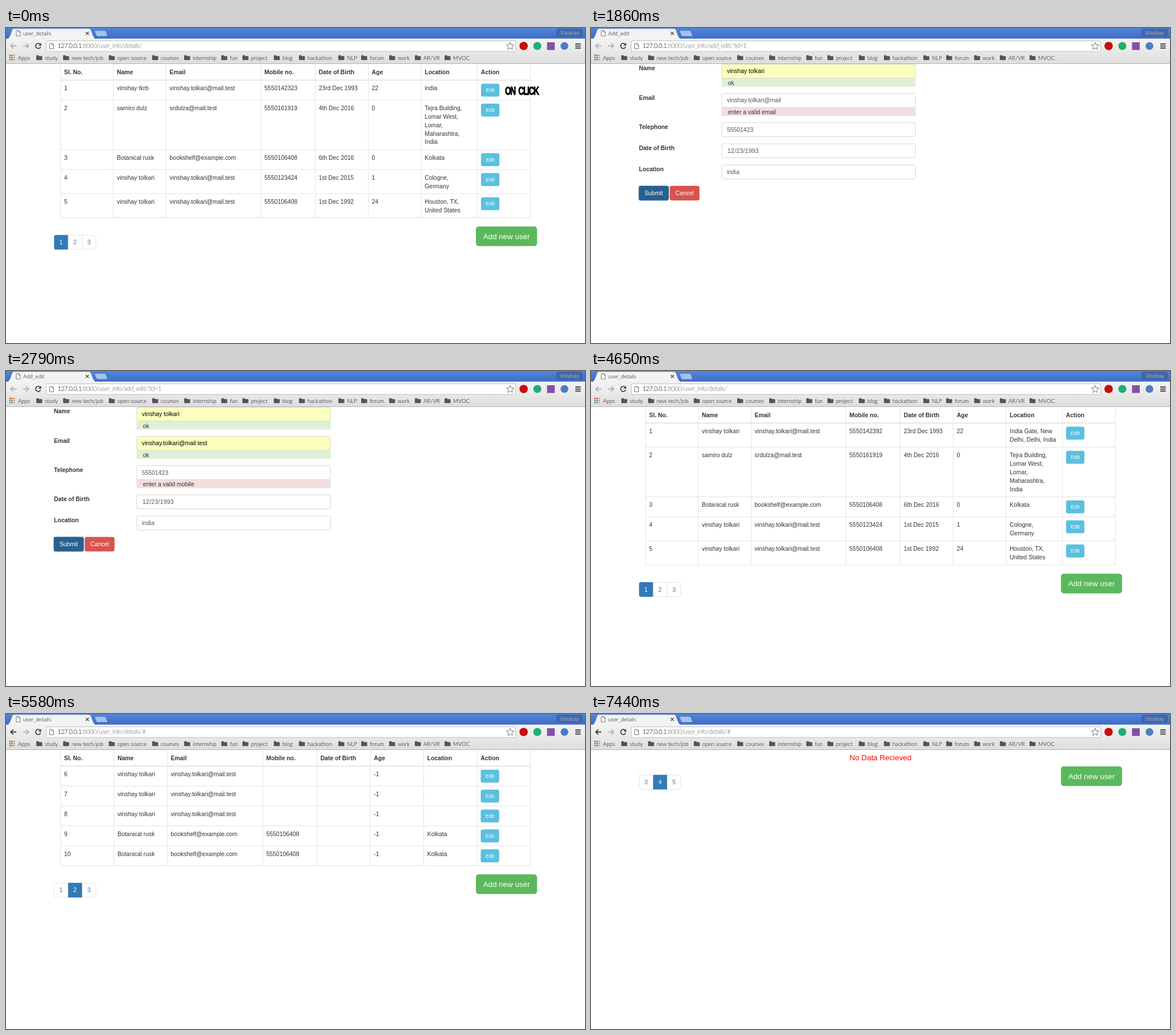
These frames come from a looping animation (1014x552 px, 8 s). An HTML page:

```html
<!DOCTYPE html>
<html lang="en">
<head>
<meta charset="utf-8">
<title>User details</title>
<style>
  html, body { margin: 0; width: 100%; height: 100%; overflow: hidden; background: #fff; }
  #stage { position: relative; width: 1014px; height: 552px; overflow: hidden; }
  #reel { position: absolute; left: 0; top: 0; animation: reel 8s step-end infinite; }
  #reel svg { display: block; width: 1014px; height: 552px; overflow: hidden; }
  @keyframes reel {
    0% { transform: translateY(0); }
    11.625% { transform: translateY(-552px); }
    23.25% { transform: translateY(-1104px); }
    34.875% { transform: translateY(-1656px); }
    46.5% { transform: translateY(-2208px); }
    58.125% { transform: translateY(-2760px); }
    69.75% { transform: translateY(-3312px); }
    81.375% { transform: translateY(-3864px); }
    93%, 100% { transform: translateY(-4416px); }
  }
  text { font: 10.39px "Liberation Sans", Arial, sans-serif; fill: #333; }
  .b { font-weight: bold; }
  .mid { text-anchor: middle; }
  .w { fill: #fff; }
  .ui { font: 300 9.7px Lato, sans-serif; fill: #000; }
  .badge { fill: #e4dccb; }
  .url { font: 300 11.2px Lato, sans-serif; letter-spacing: -.48px; fill: #666; }
  .url tspan { fill: #000; }
  .small { font-size: 8.9px; }
  .big { font-size: 13.36px; }
  .link { fill: #337ab7; }
  .red { fill: #f00; }
  .val { fill: #555; }
  .auto { fill: #000; }
  .date { letter-spacing: .3px; fill: #555; }
  .hit { font-size: 9.65px; fill: #000; }
  .hit .sub { font-size: 8.2px; fill: #999; }
  .by { font: 9.5px "Open Sans", sans-serif; fill: #666; }
  .shout { font-weight: 900; font-size: 20.5px; letter-spacing: -1px; fill: #000; stroke: #000; stroke-width: .7px; }
  .shout.tiny { font-size: 13.5px; letter-spacing: -1.2px; word-spacing: 3px; }
  .drop { filter: drop-shadow(0 1px 2px rgba(0,0,0,.35)); }
  .glow { filter: drop-shadow(0 0 2px rgba(102,175,233,.7)); }
</style>
</head>
<body>
<div id="stage"><div id="reel"></div></div>
<svg width="0" height="0" style="position:absolute">
  <defs>
    <linearGradient id="sky" x2="0" y2="1"><stop stop-color="#5186d8"/><stop offset="1" stop-color="#3f6bc4"/></linearGradient>
    <linearGradient id="bar" x2="0" y2="1"><stop stop-color="#f3f3f3"/><stop offset="1" stop-color="#dedede"/></linearGradient>
    <path id="folder" d="M0 1.2q0-1 1-1h3l1.3 1.5h4.2q1 0 1 1v5q0 1-1 1H1q-1 0-1-1z" fill="#555"/>
    <path id="page" d="M.5.5h4.3l2.7 2.7v6.8h-7zM4.8.5v2.7h2.7" fill="#fff" stroke="#666" stroke-width=".9"/>
    <path id="arrow" d="M11 5H1.5M5.8.6 1.3 5l4.5 4.4" fill="none" stroke-width="2"/>
    <path id="pin" d="M3.5 0a3.3 3.3 0 0 1 3.3 3.4C6.8 5.6 4.3 7 3.5 11 2.7 7 .2 5.6.2 3.4A3.3 3.3 0 0 1 3.5 0z" fill="#a5a5a5"/>
  </defs>
</svg>
<script>
const text = (x, y, s, cls = '') => `<text x="${x}" y="${y}" class="${cls}">${s}</text>`;
const shout = (x, y, s, tall, cls = '') =>
  `<text transform="translate(${x} ${y}) scale(1 ${tall})" class="shout ${cls}">${s}</text>`;
const rect = (x, y, w, h, fill, stroke = 'none', r = 0, cls = '') =>
  `<rect x="${x}" y="${y}" width="${w}" height="${h}" rx="${r}" fill="${fill}" stroke="${stroke}" stroke-width=".8" class="${cls}"/>`;
const path = (d, fill, stroke = 'none', sw = 1) =>
  `<path d="${d}" fill="${fill}" stroke="${stroke}" stroke-width="${sw}"/>`;
const dot = (x, y, r, fill) => `<circle cx="${x}" cy="${y}" r="${r}" fill="${fill}"/>`;
const use = (id, x, y, extra = '') => `<use href="#${id}" transform="translate(${x} ${y})" ${extra}/>`;
const button = (x, y, w, h, label, fill, edge, r, cls, dy) =>
  rect(x + .4, y + .4, w - .8, h - .8, fill, edge, r) + text(x + w / 2, y + h / 2 + dy, label, 'mid w ' + cls);

// Browser window
const bookmarks = [[53, 'study'], [100, 'new tech/job'], [180, 'open source'], [256, 'courses'],
  [312, 'internship'], [377, 'fun'], [414, 'project'], [469, 'blog'], [513, 'hackathon'],
  [582, 'NLP'], [622, 'forum'], [671, 'work'], [716, 'AR/VR'], [768, 'MVOC']];
const appColors = ['#e0443c', '#e0443c', '#f0a030', '#3fa55a', '#4a7fd4', '#f0a030', '#3fa55a', '#4a7fd4', '#f0a030'];

function star(cx, cy, R) {
  const pts = [];
  for (let i = 0; i < 10; i++) {
    const r = i % 2 ? R * .45 : R, a = i * Math.PI / 5;
    pts.push((cx + r * Math.sin(a)).toFixed(1) + ' ' + (cy - r * Math.cos(a)).toFixed(1));
  }
  return path('M' + pts.join('L') + 'z', '#fff', '#666', .9);
}

function browser(title, route, canGoBack) {
  let s = rect(0, 0, 1014, 19, 'url(#sky)') + rect(0, 18.6, 1014, 43.6, 'url(#bar)') + rect(0, 62, 1014, 1, '#b4b4b4');
  s += path('M3 18.600Q6 17 8 11L10.500 4Q11.500 1 14 1H145Q148 1 149 4L152 12Q154 17.500 157 18.600z', '#f3f3f3', '#3c5f9f', .5);
  s += rect(4, 18, 152, 1.2, '#f3f3f3');
  s += path('M156 4.500H172Q174 4.500 175 6.500L177.500 13Q178 14.500 176 14.500H161Q159 14.500 158 12.500L155.500 6Q155 4.500 156 4.500z', '#a5c2ef', '#5c82bd', .7);
  s += use('page', 17.5, 4) + text(30, 12.6, title, 'ui') + path('M139.700 6.700l5.400 5.400m0-5.400l-5.400 5.400', 'none', '#444', 1.3);
  s += rect(965, 2, 44, 12, '#4668a8', '#2c4f8d', 1.5) + text(987, 11.6, 'Vinshay', 'ui mid badge');
  const back = canGoBack ? '#444' : '#b5b5b5';
  s += use('arrow', 7, 26.5, `stroke="${back}"`);
  s += `<use href="#arrow" transform="translate(41 26.500) scale(-1 1)" stroke="#b5b5b5"/>`;
  s += path('M60 28.500A4.500 4.500 0 1 0 60.700 33', 'none', '#444', 1.8) + path('M61.700 26v5h-5z', '#444');
  s += rect(70.5, 22.5, 822, 18.5, '#fff', '#b2b2b2', 1.5) + use('page', 76, 26.5);
  s += text(90, 35.3, `<tspan>127.0.0.1</tspan>:8000/user_info/${route}`, 'url');
  s += star(883, 32, 7);
  s += dot(906.5, 31.5, 7.3, '#c70d10') + dot(930.5, 31.5, 7, '#1fae73') + rect(947.5, 25, 13.5, 13.5, '#8351a8') + dot(978, 31.5, 6.8, '#4d7cc4');
  for (let i = 0; i < 3; i++) s += rect(997, 27 + i * 3.6, 9.5, 2, '#444');
  appColors.forEach((c, i) => s += rect(5.8 + i % 3 * 3.7, 46.8 + Math.floor(i / 3) * 3.7, 2.5, 2.5, c));
  s += text(21, 55.6, 'Apps', 'ui');
  for (const [x, name] of bookmarks) s += use('folder', x, 47.5) + text(x + 15, 55.6, name, 'ui');
  return s;
}

// User list
const head = ['Sl. No.', 'Name', 'Email', 'Mobile no.', 'Date of Birth', 'Age', 'Location', 'Action'];
const wide = [95.5, 188, 280.3, 446.3, 541.5, 634.3, 727, 825.5, 918.5];
const even = [95.5, 189, 282.3, 449.5, 544.5, 638, 731.5, 825, 918.5];
const me = 'vinshay tolkari', mail = 'vinshay.tolkari@mail.test';
const kale = ['Botanical rusk', 'bookshelf@example.com', '5550106408'];

function footer(bottom, first, active) {
  const top = bottom + 30.5;
  let s = rect(84.4, top, 72.8, 24.8, '#fff', '#ddd', 3);
  for (let i = 0; i < 3; i++) {
    const n = first + i, x = 84.2 + i * 24.5, on = n === active;
    if (on && !i) s += path(`M${x + 24.5} ${top - .4}v25.600h-21.500q-3 0-3-3v-19.600q0-3 3-3z`, '#337ab7');
    else if (on) s += rect(x, top - .4, 24.7, 25.6, '#337ab7');
    else if (i) s += rect(x, top, .8, 24.8, '#ddd');
    s += text(x + 12.3, top + 16.1, n, 'mid ' + (on ? 'w' : 'link'));
  }
  return s + button(823, bottom + 15.3, 107, 34.3, 'Add new user', '#5cb85c', '#4cae4c', 4.4, 'big', 4.6);
}

function list(cols, rows, first, active) {
  let y = 91.3, s = '', lines = rect(95, 90.6, 824, 1.4, '#ddd');
  head.forEach((h, i) => s += text(cols[i] + 6.3, 81, h, 'b'));
  for (const row of rows) {
    row.forEach((cell, i) => String(cell).split('|').forEach((part, k) =>
      s += text(cols[i] + 6.3, (y + 17.8 + k * 14.85).toFixed(1), part)));
    s += button(cols[7] + 6.5, y + 6.4, 32, 22.5, 'Edit', '#5bc0de', '#46b8da', 2.2, 'small', 3.1);
    const n = row[6].split('|').length;
    y += Math.max(34.9, 12.6 + 14.85 * n);
    lines += rect(95, y - .4, 824, .8, '#ddd');
  }
  for (const x of cols) lines += rect(x - .4, 63, .8, y - 63, '#ddd');
  return lines + s + footer(y, first, active);
}

const others = [
  [2, 'samiro dulz', 'srdulza@mail.test', '5550161919', '4th Dec 2016', 0, 'Tejra Building,|Lomar West,|Lomar,|Maharashtra,|India'],
  [3, ...kale, '6th Dec 2016', 0, 'Kolkata'],
  [4, me, mail, '5550123424', '1st Dec 2015', 1, 'Cologne,|Germany'],
  [5, me, mail, '5550106408', '1st Dec 1992', 24, 'Houston, TX,|United States']];
const firstPage = (name, tel, place) =>
  list(wide, [[1, name, mail, tel, '23rd Dec 1993', 22, place], ...others], 1, 1);
const blank = n => [n, me, mail, '', '', -1, ''];
const kolkata = n => [n, ...kale, '', -1, 'Kolkata'];

// Edit form
function form(fields, pressed, focus) {
  let y = 63, s = '';
  const labels = ['Name', 'Email', 'Telephone', 'Date of Birth', 'Location'];
  fields.forEach(([value, note, filled], i) => {
    const lit = focus === i;
    s += text(84, y + 11.4, labels[i], 'b');
    if (note) {
      s += rect(228.6, y + 25, 340, 14.8, note === 'ok' ? '#dff0d8' : '#f2dede') + text(239.7, y + 36.8, note);
    }
    s += rect(229, y + .4, 339.2, 24.6, filled ? '#faffbd' : '#fff', lit ? '#66afe9' : '#ccc', 3, lit ? 'glow' : '');
    s += text(i === 3 ? 239 : 238, y + 16.2, value, filled ? 'auto' : i === 3 ? 'date' : 'val');
    if (lit) s += rect(261, y + 7, .8, 11.5, '#333');
    y += note ? 51.2 : 37.1;
  });
  s += button(83.7, y, 52.3, 25.4, 'Submit', pressed ? '#286090' : '#337ab7', pressed ? '#204d74' : '#2e6da4', 3, '', 3.6);
  if (pressed) s += rect(83.2, y - .3, 53.3, 26, 'none', '#7fb0dc', 3);
  return s + button(138, y, 52, 25.4, 'Cancel', '#d9534f', '#d43f3a', 3, '', 3.6);
}

function suggestions() {
  const hits = [['India', '', ''], ['India', 'napolis', 'IN, United States'], ['India', 'na', 'United States'],
    ['India', ' Gate', 'New Delhi, Delhi, India'], ['India', 'n Trail', 'NC, United States']];
  let s = rect(228.6, 279.8, 339, 127, '#fff', 'none', 1.5, 'drop');
  hits.forEach(([bold, rest, sub], i) => {
    const y = 280 + i * 23;
    if (i === 3) s += rect(228.6, y, 339, 23, '#fafafa');
    if (i) s += rect(228.6, y, 339, .8, '#e6e6e6');
    s += use('pin', 233.8, y + 6);
    s += text(248, y + 14.7, `<tspan class="b">${bold}</tspan>${rest} <tspan class="sub">${sub}</tspan>`, 'hit');
  });
  return s + text(477.5, 403.5, 'powered by', 'by') + dot(549, 400.3, 5, '#4285f4');
}

const born = ['12/23/1993'], india = ['india'];
const details = (body, route = 'details/') => browser('user_details', route, route.endsWith('#')) + body;
const edit = body => browser('Add_edit', 'add_edit/?id=1', false) + body;
const badTel = 'enter a valid mobile';

const scenes = [
  details(firstPage('vinshay tkrb', '5550142323', 'india') + shout(874, 116.5, 'ON CLICK', 1.5, 'tiny')),
  edit(form([['vinshay tkrb'], [mail], ['5550142323'], born, india])),
  edit(form([[me, 'ok', 1], ['vinshay.tolkari@mail', 'enter a valid email'], ['55501423'], born, india], true)),
  edit(form([[me, 'ok', 1], [mail, 'ok', 1], ['55501423', badTel], born, india], true)),
  edit(form([[me, 'ok', 1], [mail, 'ok', 1], ['5550142392', badTel], born, india], false, 4) + suggestions() +
    shout(619, 224, 'Submit only if', 1.3) + shout(619, 247, 'validation passes', 1.3)),
  details(firstPage(me, '5550142392', 'India Gate, New|Delhi, Delhi, India')),
  details(list(even, [blank(6), blank(7), blank(8), kolkata(9), kolkata(10)], 1, 2), 'details/#'),
  details(list(wide, [kolkata(11), kolkata(12), [13, me, mail, '5550106408', '', -1, 'Lomar West,|Lomar,|Maharashtra,|India'],
    kolkata(14), blank(15)], 2, 3), 'details/#'),
  details(text(507, 81.3, 'No Data Recieved', 'mid big red') + footer(76.5, 3, 4), 'details/#')
];
document.getElementById('reel').innerHTML = scenes.map(s =>
  `<svg viewBox="0 0 1014 552">${rect(0, 0, 1014, 552, '#fff')}${s}</svg>`).join('');
</script>
</body>
</html>
```
